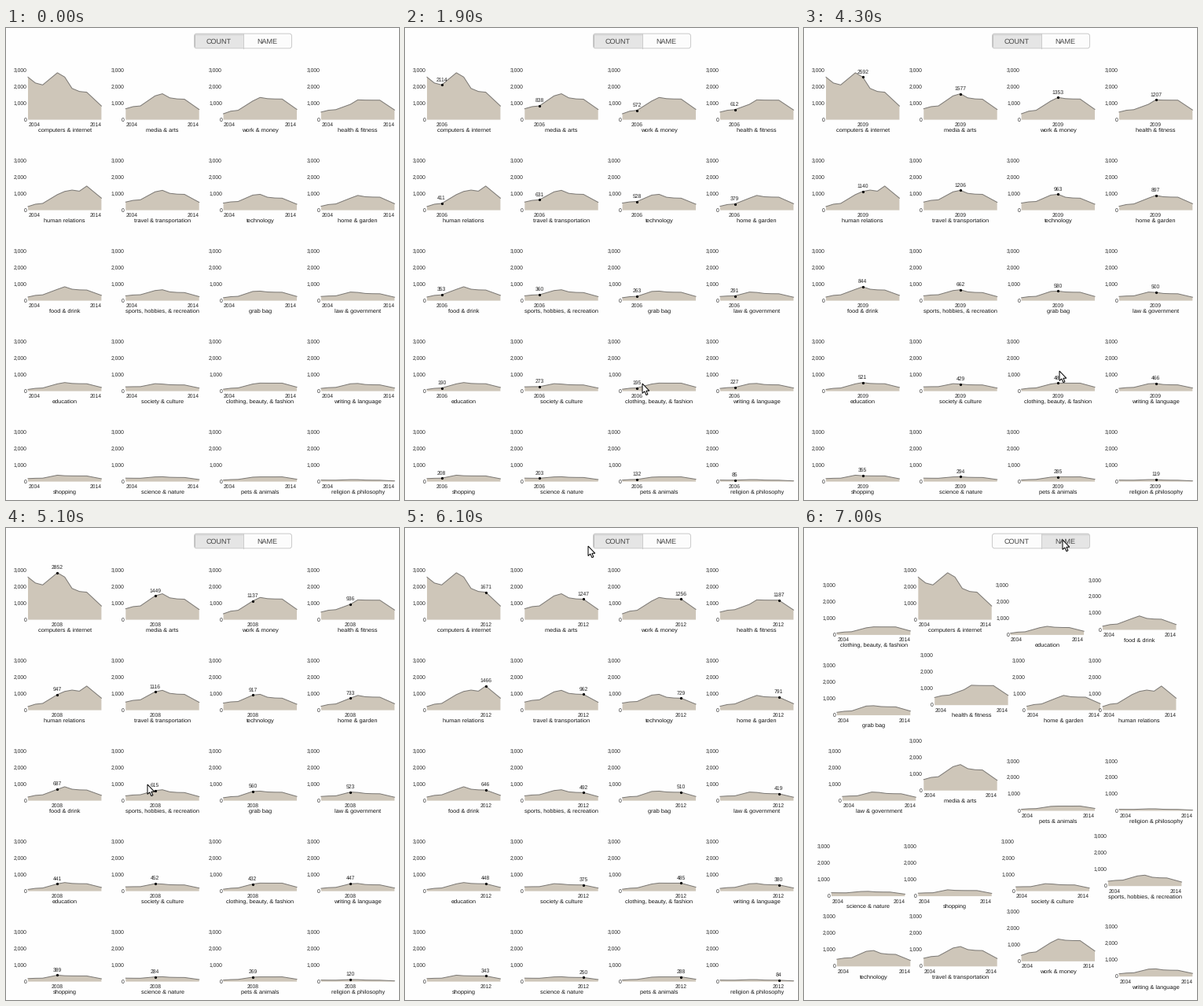
Animation of 500 by 600 pixels, one loop 7.1 s. Source, as a matplotlib script:

```python
import numpy as np
import matplotlib.pyplot as plt
from matplotlib.animation import FuncAnimation
from matplotlib.patches import FancyBboxPatch, Polygon, Rectangle
from matplotlib.transforms import Affine2D

W, H, DPI = 500, 600, 100
FRAMES, STEP = 71, 100
PX = 72 / DPI

plt.rcParams["font.family"] = "Liberation Sans"
plt.rcParams["text.hinting"] = "no_hinting"

LEFT, BASE = 28.0, 116.6          # origin of the first chart
COL, ROW = 124.3, 115.0           # grid pitch
CW, CH = 93.4, 62.8               # plot area
DX = CW / 10

# Counts in 2006, 2008, 2009 and 2012, listed by total
COUNTS = {
    "computers & internet": (2114, 2852, 2592, 1671),
    "media & arts": (838, 1449, 1577, 1247),
    "work & money": (572, 1137, 1353, 1256),
    "health & fitness": (612, 936, 1207, 1187),
    "human relations": (411, 947, 1140, 1466),
    "travel & transportation": (631, 1116, 1206, 962),
    "technology": (528, 917, 963, 729),
    "home & garden": (379, 733, 897, 791),
    "food & drink": (353, 687, 844, 646),
    "sports, hobbies, & recreation": (360, 615, 662, 492),
    "grab bag": (263, 560, 580, 510),
    "law & government": (291, 523, 500, 419),
    "education": (190, 441, 521, 448),
    "society & culture": (273, 452, 429, 375),
    "clothing, beauty, & fashion": (195, 432, 489, 485),
    "writing & language": (227, 447, 466, 380),
    "shopping": (208, 389, 355, 343),
    "science & nature": (203, 284, 294, 250),
    "pets & animals": (132, 269, 285, 288),
    "religion & philosophy": (85, 120, 119, 84),
}

# Turns and rests of the pointer tip, by step
PATH = {
    7: (489, 586), 14: (345, 478), 16: (284, 452), 19: (302, 452),
    22: (318, 455), 24: (298, 453), 27: (340, 451), 29: (328, 447),
    32: (328, 445), 34: (346, 440), 38: (331, 436), 42: (331, 436),
    43: (325, 436), 46: (325, 436), 50: (194, 338), 51: (180, 326),
    54: (171, 304), 60: (229, 85), 61: (233, 23), 62: (240, 0),
    65: (329, 15),
}
ENTER = min(PATH)
PRESS = 67                        # step at which NAME is clicked
SORT_START, SORT_TIME = 6717, 400

ARROW = np.array([(0, 0), (0, 12.4), (2.8, 9.9), (4.9, 14.6),
                  (6.9, 13.7), (4.9, 9.2), (8.8, 9.2)])


def series(v06, v08, v09, v12):
    """All years 2004-2014: a slow start, a plateau, then a steady decline."""
    v04 = 1.5 * v06**2 / v09
    v05 = 0.25 * v04 + 0.75 * v06
    v07 = (v06 + v08) / 2
    low, gap = min(v09, v12), abs(v09 - v12)
    return np.array([v04, v05, v06, v07, v08, v09, low + 0.25 * gap,
                     low + 0.05 * gap, v12, 0.75 * v12, 0.5 * v12])


def slot_xy(i):
    return np.array([LEFT + i % 4 * COL, BASE + i // 4 * ROW])


def ease(t):
    """CSS 'ease' timing curve."""
    s = np.linspace(0, 1, 400)
    x = 0.75 * s * (1 - s) + s**3
    y = 0.3 * s * (1 - s)**2 + 3 * s**2 * (1 - s) + s**3
    return np.interp(t, x, y)


def pointer(k):
    return np.array([np.interp(k, list(PATH), axis)
                     for axis in zip(*PATH.values())])


def hovered(k):
    """Year index under the pointer; the page reacts one step late."""
    if k - 1 < ENTER or k >= PRESS:
        return None
    x, y = pointer(k - 1)
    u = (x - LEFT) % COL
    v = y - (BASE - CH)
    if v < 0 or v % ROW >= CH or u >= CW:
        return None
    return int(u / DX)


fig = plt.figure(figsize=(W / DPI, H / DPI), dpi=DPI, facecolor="#fefefe")
ax = fig.add_axes([0, 0, 1, 1])
ax.set(xlim=(0, W), ylim=(H, 0))
ax.axis("off")


def label(x, y, s, size=6.8, color="#222222", ha="center", **kw):
    return ax.text(x, y, s, fontsize=size * PX, color=color, ha=ha,
                   va="baseline", **kw)


class Chart:
    def __init__(self, name, home, target):
        self.home, self.target = home, target
        self.values = series(*COUNTS[name])
        self.x = np.arange(11) * DX
        self.y = -self.values * CH / 3000
        self.shift = Affine2D()
        tr = self.shift + ax.transData

        outline = np.column_stack([self.x, self.y])
        ax.add_patch(Polygon([(0, 0), *outline, (CW, 0)], fc="#cec6b9",
                             lw=0, transform=tr))
        ax.plot(self.x, self.y, color="#7b7874", lw=PX, transform=tr)
        for i in range(4):
            label(-1.6, 2 - i * CH / 3, f"{i * 1000:,}", ha="right",
                  transform=tr)
        label(CW / 2, 15, name, size=7.4, color="#111111", transform=tr)
        self.ends = [label(0.4, 8.5, "2004", ha="left", transform=tr),
                     label(CW, 8.5, "2014", ha="right", transform=tr)]
        self.dot, = ax.plot([0], [0], "o", ms=3.2 * PX, color="black", mew=0,
                            transform=tr)
        self.year = label(0, 8.5, "", transform=tr)
        self.count = label(0, 0, "", transform=tr)

    def update(self, year, p):
        x, y = self.home + (self.target - self.home) * p
        self.shift.clear().translate(x, y)
        on = year is not None
        for t in self.ends:
            t.set_visible(not on)
        for a in (self.dot, self.year, self.count):
            a.set_visible(on)
        if on:
            px, py = self.x[year], self.y[year]
            self.dot.set_data([px], [py])
            self.year.set_x(px)
            self.year.set_text(str(2004 + year))
            self.count.set_position((px, py - 4.8))
            self.count.set_text(f"{self.values[year]:.0f}")


class Toggle:
    X, Y, BW, BH = 239.5, 7.2, 62, 18.6

    def __init__(self):
        def frame(**kw):
            return ax.add_patch(FancyBboxPatch(
                (self.X, self.Y), 2 * self.BW, self.BH,
                boxstyle="round,pad=0,rounding_size=3", **kw))

        base = frame(fc="#fcfcfc", lw=0, zorder=5)
        self.parts = [Rectangle((0, self.Y), self.BW, self.BH, fc="#e5e5e5",
                                lw=0, zorder=6)]
        for i in range(3):
            self.parts.append(Rectangle(
                (0, self.Y + i), self.BW, self.BH, fill=False, ec="black",
                lw=PX, alpha=0.09 - 0.03 * i, zorder=6))
        for part in self.parts:
            ax.add_patch(part)
            part.set_clip_path(base)
        frame(fc="none", ec="#cccccc", lw=PX, zorder=7)
        mid = self.X + self.BW
        ax.plot([mid, mid], [self.Y, self.Y + self.BH], color="#cccccc",
                lw=PX, zorder=7)
        for i, s in enumerate(("COUNT", "NAME")):
            label(self.X + (i + 0.5) * self.BW, 20.2, s, size=9,
                  color="#444444", zorder=8)

    def update(self, active):
        for part in self.parts:
            part.set_x(self.X + active * self.BW)


by_name = sorted(COUNTS)
charts = [Chart(n, slot_xy(i), slot_xy(by_name.index(n)))
          for i, n in enumerate(COUNTS)]
toggle = Toggle()
arrow = ax.add_patch(Polygon(ARROW, fc="white", ec="black", lw=PX,
                             joinstyle="miter", zorder=10))


def draw(k):
    p = ease(np.clip((k * STEP - SORT_START) / SORT_TIME, 0, 1))
    year = hovered(k)
    for c in charts:
        c.update(year, p)
    toggle.update(int(k >= PRESS))
    arrow.set_visible(k >= ENTER)
    arrow.set_xy(ARROW + pointer(k))
    return []


anim = FuncAnimation(fig, draw, frames=FRAMES, interval=STEP, repeat=True,
                     repeat_delay=0, blit=False)
plt.show()
```
